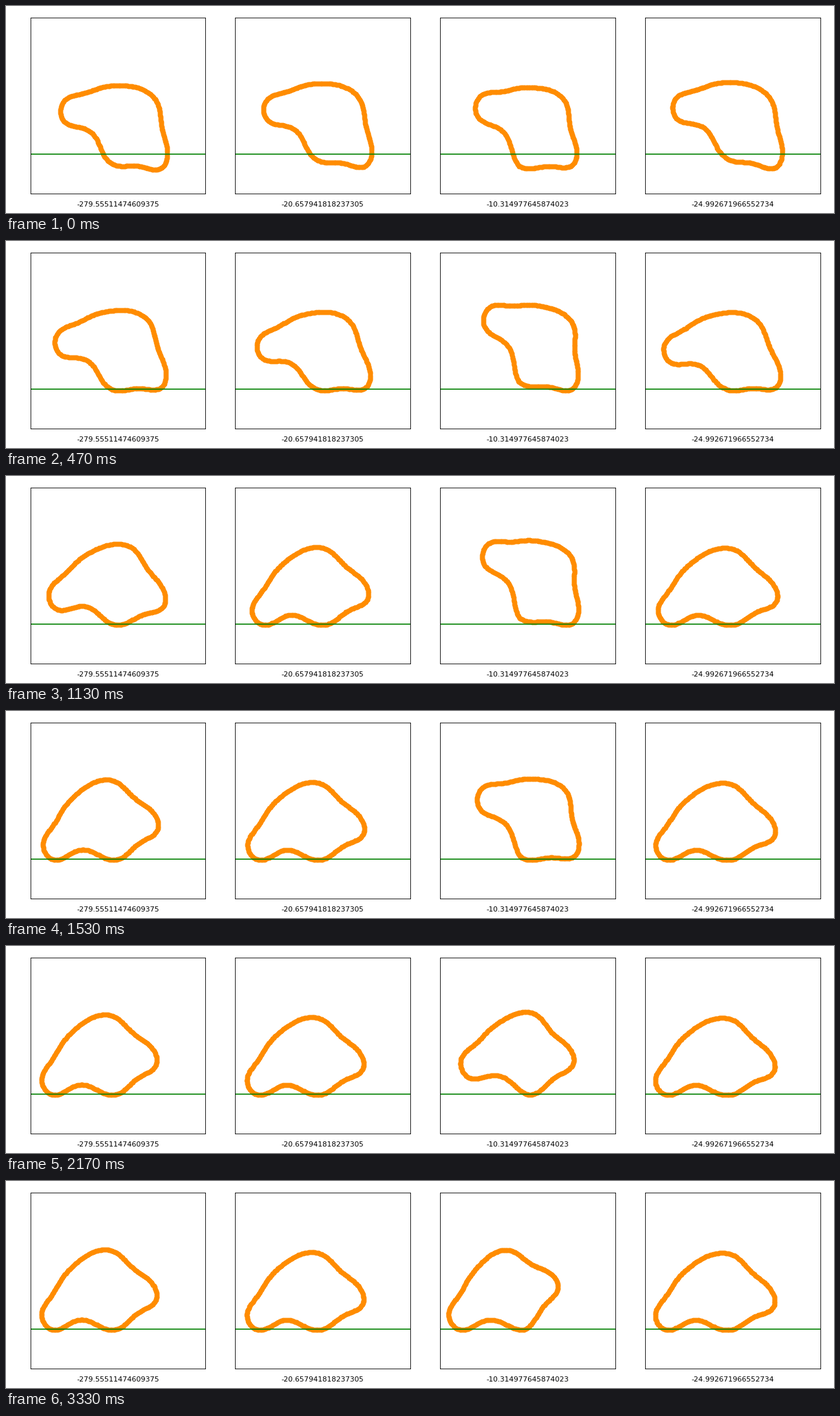
These frames come from a looping animation (1280x320 px, 3360 ms). A matplotlib script:

```python
import numpy as np
import matplotlib.pyplot as plt
from matplotlib.animation import FuncAnimation

W, H, DPI = 1280, 320, 80
FRAMES, INTERVAL = 112, 30
STEP_MS = 100 / 3

# Panel layout in pixels, y measured downwards
LEFT, WIDTH, PITCH = 37.5, 270.7, 316.9
TOP, BOTTOM = 17.6, 289.6
GROUND, FLOOR = 228.7, 230.4

START_X = 159          # pivot foot within the first panel at the start
STRETCH = 1.07         # vertical scale of the axes relative to horizontal
SETTLE_TAU, SLIDE_TAU = 4.5, 6
TOPPLE_START, TOPPLE_POWER = 14, 3.3

# Evenly spaced key points around the body, relative to the pivot foot
BODY = [(-92, -1), (-110, -22), (-98.5, -49), (-82, -75),
        (-63.5, -98), (-40, -116.5), (-11, -125), (14.5, -113),
        (36.5, -92.5), (60, -74), (66, -46), (42.5, -29.5),
        (19.5, -10), (-7, -1.5), (-35, -14), (-64.5, -12)]


def closed_curve(points, n=256):
    """Smooth closed curve through the points by Fourier interpolation."""
    z = np.array([complex(*p) for p in points])
    f = np.fft.fft(z)
    half = len(z) // 2
    mid = [f[half] / 2]
    gap = np.zeros(n - len(z) - 1)
    spectrum = np.concatenate([f[:half], mid, gap, mid, f[half + 1:]])
    return np.fft.ifft(spectrum) * n / len(z)


class Blob:
    """Settles onto the floor, topples onto its left foot, then slides."""

    def __init__(self, fan, wide, tall, sink, start, stance, land, land_x, rest_x):
        z = closed_curve(BODY)
        # Swing the right side of the body about the pivot foot
        z = z * np.exp(1j * np.radians(fan) * (1 + np.cos(np.angle(z))) / 2)
        self.shape = z.real * wide + 1j * z.imag * tall / STRETCH
        self.sink, self.start, self.stance = sink, start, stance
        self.land, self.land_x, self.rest_x = land, land_x, rest_x

    def pose(self, step):
        settle = np.exp(-step / SETTLE_TAU)
        span = self.land - TOPPLE_START
        fall = np.clip((step - TOPPLE_START) / span, 0, 1) ** TOPPLE_POWER
        slide = 1 - np.exp(-max(step - self.land, 0) / SLIDE_TAU)

        tilt = (self.stance + (self.start - self.stance) * settle) * (1 - fall)
        pivot = (START_X + (self.land_x - START_X) * fall
                 + (self.rest_x - self.land_x) * slide)
        z = self.shape * np.exp(1j * np.radians(tilt))
        y = z.imag * STRETCH
        return z.real + pivot, y - y.max() + FLOOR + self.sink * settle


PANELS = {
    "-279.55511474609375": Blob(
        fan=0, wide=1, tall=1, sink=22.7, start=40, stance=32.5,
        land=37.7, land_x=174, rest_x=165),
    "-20.657941818237305": Blob(
        fan=5, wide=0.99, tall=0.965, sink=19, start=37, stance=27.7,
        land=33, land_x=173.5, rest_x=164.5),
    "-10.314977645874023": Blob(
        fan=-18, wide=1.05, tall=1.02, sink=21, start=48, stance=56.5,
        land=70, land_x=181, rest_x=166),
    "-24.992671966552734": Blob(
        fan=8.5, wide=1, tall=0.955, sink=21, start=36.7, stance=23.5,
        land=29, land_x=172.5, rest_x=163),
}

plt.rcParams["font.family"] = "DejaVu Sans"
fig = plt.figure(figsize=(W / DPI, H / DPI), dpi=DPI, facecolor="white")


def add_panel(i, label):
    left = LEFT + PITCH * i
    ax = fig.add_axes([left / W, 1 - BOTTOM / H, WIDTH / W, (BOTTOM - TOP) / H])
    ax.set(xlim=(LEFT, LEFT + WIDTH), ylim=(BOTTOM, TOP), xticks=[], yticks=[])
    dots, = ax.plot([], [], "o", color="darkorange")
    ax.axhline(GROUND, color="green")
    ax.text(LEFT + WIDTH / 2, 310.4, label, fontsize=10, ha="center", va="baseline")
    return dots


curves = [add_panel(i, label) for i, label in enumerate(PANELS)]


def draw(n):
    step = int((n * INTERVAL + 25) / STEP_MS)
    for dots, blob in zip(curves, PANELS.values()):
        dots.set_data(*blob.pose(step))
    return curves


anim = FuncAnimation(fig, draw, frames=FRAMES, interval=INTERVAL,
                     init_func=lambda: draw(0), repeat=True, repeat_delay=0)
plt.show()
```
